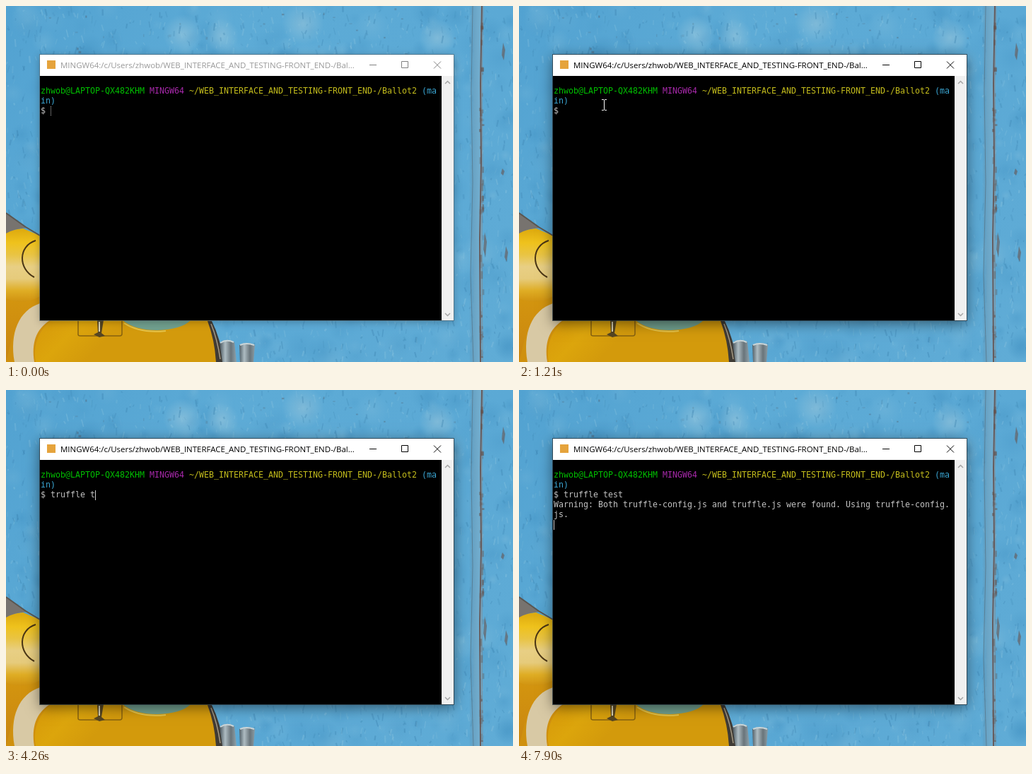
An HTML page with a canvas for the animation above (8 s loop, 717x504 px).

```html
<!DOCTYPE html>
<html lang="en">
<head>
<meta charset="utf-8">
<title>Terminal</title>
<style>
  html, body { margin: 0; width: 100%; height: 100%; overflow: hidden; background: #59a9d8; }
  canvas { display: block; width: 717px; height: 504px; }
</style>
</head>
<body>
<canvas id="stage" width="717" height="504"></canvas>
<script>
const W = 717, H = 504, LOOP = 8000;
const ctx = document.getElementById('stage').getContext('2d');

const MONO = '11.63px "DejaVu Sans Mono", monospace';
const SANS = '11.48px "Open Sans", "Noto Sans", sans-serif';
const LEFT = 49, TOP = 114, COL = 7, ROW = 14;
const WIN = { x: 48, y: 69, w: 585, h: 376, bar: 30 };
const USER = 'zhwob', HOST = 'LAPTOP-QX482KHM';
const FOLDER = 'WEB_INTERFACE_AND_TESTING-FRONT_END-';
const TITLE = `MINGW64:/c/Users/${USER}/${FOLDER}/Bal...`;
const COMMAND = 'truffle test';
const KEYS = [1760, 1910, 2220, 2600, 2770, 2920, 3240, 3390, 4260, 4340, 4550, 4720];
const ACTIVE = 660, SHADOWED = 750, ENTER = 5030, OUTPUT = 7900;
const MOVE = { start: 70, end: 510, steps: 6, from: [331, 351], to: [120, 132] };
const CARET_OFF = [[1210, 1760], [3940, 4260], [5560, 6040], [6590, 7120], [7670, 7900]];

function randomizer(seed) {
  return () => (seed = (seed * 16807) % 2147483647) / 2147483647;
}

function rect(c, color, x, y, w, h) {
  c.fillStyle = color;
  c.fillRect(x, y, w, h);
}

function shape(c, d, fill, stroke, width = 1) {
  const p = new Path2D(d);
  if (fill) { c.fillStyle = fill; c.fill(p); }
  if (stroke) { c.strokeStyle = stroke; c.lineWidth = width; c.stroke(p); }
}

function gradient(c, x0, y0, x1, y1, ...colors) {
  const g = c.createLinearGradient(x0, y0, x1, y1);
  colors.forEach((col, i) => g.addColorStop(i / (colors.length - 1), col));
  return g;
}

function blotch(c, x, y, r, tone, alpha) {
  const g = c.createRadialGradient(x, y, 0, x, y, r);
  g.addColorStop(0, `rgba(${tone},${alpha})`);
  g.addColorStop(1, `rgba(${tone},0)`);
  rect(c, g, x - r, y - r, 2 * r, 2 * r);
}

function drawWood(c) {
  const rnd = randomizer(4127);
  rect(c, gradient(c, 0, 0, W, H, '#52a2d1', '#5dabd6', '#5ba9d5', '#60acd6'), 0, 0, W, H);

  // Uneven paint
  for (let i = 0; i < 420; i++) {
    const tone = rnd() < 0.5 ? '60,140,190' : '130,190,220';
    blotch(c, rnd() * W, rnd() * H, 6 + rnd() * 18, tone, 0.1 + rnd() * 0.25);
  }
  for (const [x, y, r] of [[250, 40, 28], [305, 42, 24], [420, 25, 30], [610, 45, 26]]) {
    blotch(c, x, y, r, '165,205,222', 0.5);
  }

  // Grain
  for (let i = 0; i < 2400; i++) {
    const x = rnd() * W, y = rnd() * H, len = 2 + rnd() * 9, lean = rnd() * 6 - 3;
    const tone = rnd() < 0.5 ? '55,125,170' : '145,200,225';
    shape(c, `M${x} ${y}l${lean} ${len}`, null, `rgba(${tone},${0.1 + rnd() * 0.25})`, 1 + rnd() * 1.5);
  }
  for (let i = 0; i < 35; i++) {
    rect(c, `rgba(80,95,110,${rnd() * 0.45})`, rnd() * 655, rnd() * 68, 1 + rnd() * 3, 1 + rnd() * 3);
  }

  // Gap between the planks
  rect(c, gradient(c, 655, 0, 678, 0, 'rgba(95,145,175,0)', '#6ba5c6', '#72aecf', '#6a95ae'), 655, 0, 18, H);
  shape(c, 'M660 0 L658 120 L660 250 L657 380 L661 504', null, 'rgba(85,100,112,.55)', 1);
  shape(c, 'M673 0 L671 110 L672 220 L670 330 L671 504', null, '#675b5c', 2);
  shape(c, 'M675 0 L673 110 L674 220 L673 330 L674 504', null, 'rgba(145,125,115,.5)', 1);

  // Worn paint
  for (let i = 0; i < 45; i++) {
    const x = 669 + rnd() * 5, y = rnd() * H;
    rect(c, `rgba(100,78,70,${0.15 + rnd() * 0.4})`, x, y, 1 + rnd() * 3, 2 + rnd() * 9);
  }
  for (const [x, y, h] of [[703, 52, 25], [677, 320, 35], [707, 340, 22], [702, 230, 10]]) {
    shape(c, `M${x} ${y}l3 ${h * 0.4}l-2 ${h * 0.6}l-3 ${-h * 0.3}z`, 'rgba(105,85,80,.6)');
  }
}

function drawScooter(c) {
  const body = gradient(c, 0, 318, 0, 420,
    '#dfac10', '#efc21c', '#e9c443', '#e8cf84', '#e6cb7c', '#dfad24', '#cf900f');
  shape(c, 'M0 321 Q10 316 24 315 L48 325 L48 445 L287 445 Q296 470 303 504 L0 504z', body);
  shape(c, 'M0 293 L30 314 Q12 315 0 322z', '#77736f');
  shape(c, 'M0 293 L28 313 L48 325', null, '#5a5650', 2);
  shape(c, 'M42 332 C17 340 17 372 40 384', null, '#4b3615', 2);
  shape(c, 'M0 414 Q25 425 48 411 L48 421 Q16 434 8 472 L0 504z',
    gradient(c, 0, 414, 0, 504, '#d3950f', '#c98510'));
  shape(c, 'M48 421 C18 431 5 463 12 504 L40 504 C36 477 42 458 62 445 L48 445z', '#d8c9a5');
  shape(c, 'M64 445 C45 460 38 482 42 504 L301 504 L285 445z',
    gradient(c, 50, 445, 110, 504, '#d79a0a', '#dca50c', '#d39a0c'));
  shape(c, 'M165 445 Q182 459 214 459 Q248 458 261 445z', '#709f8e');
  shape(c, 'M167 449 Q190 464 226 460', null, '#e3c24a', 2);
  shape(c, 'M102 446 V465 Q102 467 105 467 H161 Q164 467 164 464 V446', null, '#86620f', 1.5);
  shape(c, 'M129 445 H138 L135 463 L140 467 L132 469 L124 465 L130 462z', '#554522');
  rect(c, '#d9d2b4', 131, 447, 2, 14);

  // Trim and exhaust
  shape(c, 'M285 446 L291 446 Q303 470 308 504 L297 504 Q295 472 285 446z', '#3f3b35');
  shape(c, 'M290 450 Q299 472 303 500', null, '#a59a84', 1.5);
  const chrome = x => gradient(c, x, 0, x + 24, 0, '#45525a', '#aebcc2', '#69747a', '#8fa2ab');
  shape(c, 'M302 477 Q312 469 323 476 L326 504 H306z', chrome(302));
  shape(c, 'M330 480 Q340 474 352 480 L350 504 H331z', chrome(329));
  shape(c, 'M303 477 Q312 471 322 476 M331 480 Q340 476 351 480', null, '#c9d5d8', 2);
}

function makeBackdrop() {
  const layer = document.createElement('canvas');
  layer.width = W;
  layer.height = H;
  const c = layer.getContext('2d');
  drawWood(c);
  drawScooter(c);
  return layer;
}

function drawWindow(t) {
  const active = t >= ACTIVE, { x, y, w, h, bar } = WIN;
  const ink = active ? '#000' : '#999';

  ctx.save();
  ctx.shadowColor = `rgba(0,0,0,${t >= SHADOWED ? 0.5 : active ? 0.38 : 0.28})`;
  ctx.shadowBlur = active ? 18 : 11;
  ctx.shadowOffsetY = active ? 4 : 2;
  rect(ctx, '#000', x, y, w, h);
  ctx.restore();

  ctx.strokeStyle = active ? 'rgba(40,55,65,.75)' : 'rgba(80,100,112,.6)';
  ctx.lineWidth = 1;
  ctx.strokeRect(x - 0.5, y - 0.5, w + 1, h + 1);
  rect(ctx, '#fff', x, y, w, bar);
  rect(ctx, '#f0f0f0', 616, y + bar, 17, h - bar);
  shape(ctx, 'M621 110 L624.5 106.5 L628 110 M621 435 L624.5 438.5 L628 435', null, '#a6a6a6', 1.5);

  rect(ctx, '#e5a33c', 58, 77, 12, 12);
  ctx.font = SANS;
  ctx.fillStyle = ink;
  ctx.fillText(TITLE, 77, 88);
  shape(ctx, 'M514 83.5 H524 M559.5 78.5 H568.5 V87.5 H559.5z M605 78.5 L615 88.5 M615 78.5 L605 88.5',
    null, active ? '#000' : '#808080');
}

function print(text, col, row, color = '#c3c3c3') {
  ctx.font = MONO;
  ctx.fillStyle = color;
  ctx.fillText(text, LEFT + col * COL, TOP + row * ROW + 10);
}

function drawCaret(t, col, row) {
  if (CARET_OFF.some(([from, to]) => t >= from && t < to)) return;
  const x = LEFT + col * COL, y = TOP + row * ROW;
  if (t >= ACTIVE) return rect(ctx, '#d0d0d0', x, y, 1, ROW);
  for (let i = 0; i < ROW; i += 2) rect(ctx, '#bfbfbf', x, y + i, 1, 1);
}

function drawConsole(t) {
  const login = `${USER}@${HOST}`;
  const path = `~/${FOLDER}/Ballot2`;
  print(login, 0, 0, '#00c000');
  print('MINGW64', login.length + 1, 0, '#a829ab');
  print(path, login.length + 9, 0, '#c4bd1c');
  print('(ma', login.length + path.length + 10, 0, '#3ba7d5');
  print('in)', 0, 1, '#3ba7d5');

  const typed = KEYS.filter(k => t >= k).length;
  print('$ ' + COMMAND.slice(0, typed), 0, 2);
  if (t >= OUTPUT) {
    print('Warning: Both truffle-config.js and truffle.js were found. Using truffle-config.', 0, 3);
    print('js.', 0, 4);
    drawCaret(t, 0, 5);
  } else if (t >= ENTER) {
    drawCaret(t, 0, 3);
  } else {
    drawCaret(t, 2 + typed, 2);
  }
}

function drawPointer(t) {
  const { start, end, steps, from, to } = MOVE;
  if (t < start || t >= KEYS[0]) return;
  const p = Math.min(1, Math.floor((t - start) / (end - start) * steps + 1e-6) / steps);
  const ease = 1 - (1 - p) ** 2;
  const [x, y] = from.map((v, i) => Math.round(v + (to[i] - v) * ease));
  const white = '#fff';
  rect(ctx, white, x, y + 1, 1, 14);
  for (const dy of [0, 15]) {
    rect(ctx, white, x - 3, y + dy, 3, 1);
    rect(ctx, white, x + 1, y + dy, 3, 1);
  }
}

const backdrop = makeBackdrop();
const begin = performance.now();

function render() {
  const t = (performance.now() - begin) % LOOP;
  ctx.drawImage(backdrop, 0, 0);
  drawWindow(t);
  drawConsole(t);
  drawPointer(t);
  requestAnimationFrame(render);
}
render();
</script>
</body>
</html>
```
